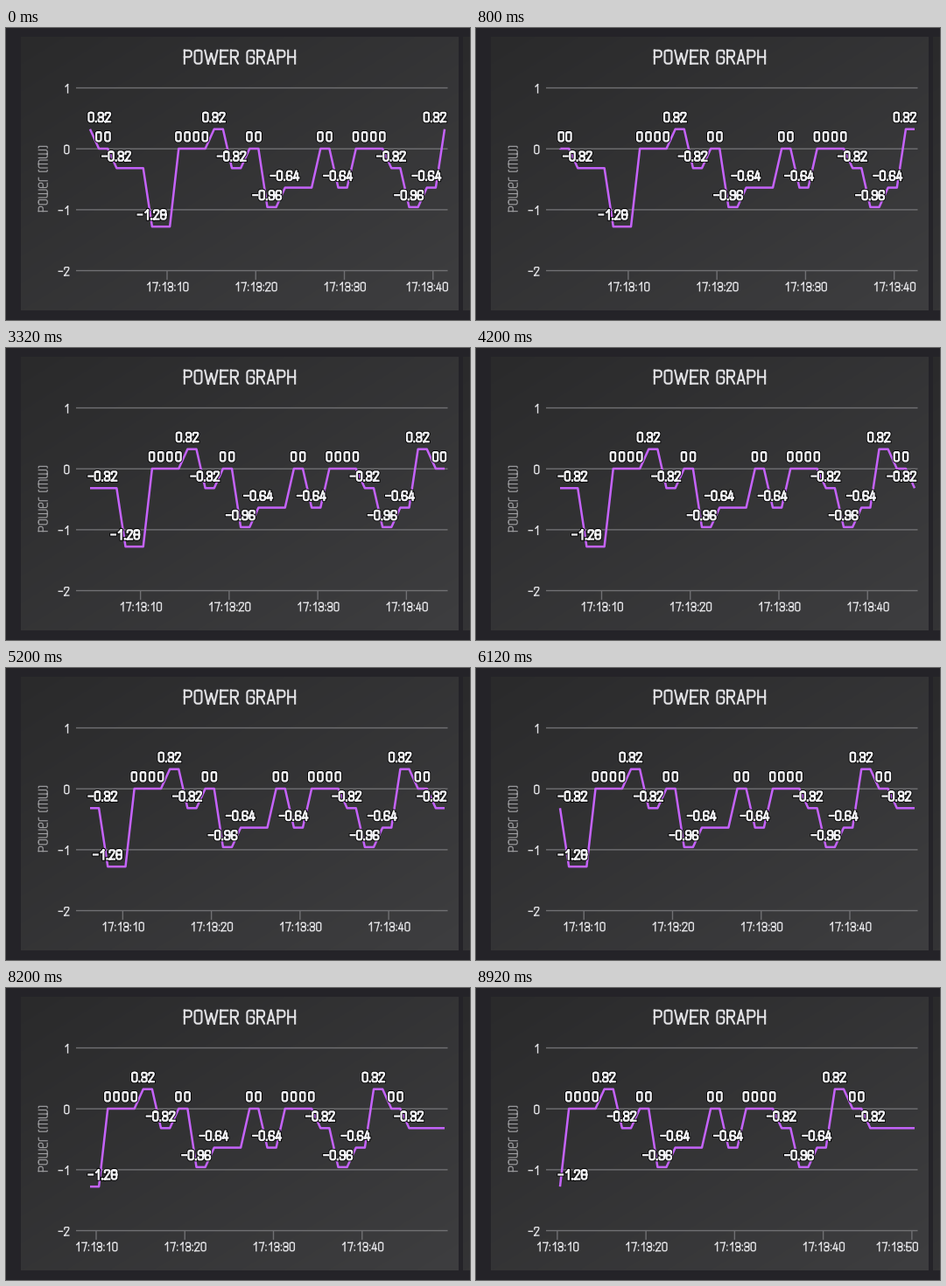
Write a matplotlib script that moves like this. It is 530x334 px and loops after 9 s.

```python
import matplotlib.pyplot as plt
import numpy as np
from matplotlib.animation import FuncAnimation
from matplotlib.patches import PathPatch
from matplotlib.patheffects import withStroke
from matplotlib.path import Path
from matplotlib.transforms import Affine2D

W, H, PX = 530, 334, 0.72          # stage size, points per pixel
LEFT, RIGHT = 80, 504.5            # plot area
X0, STEP, SPAN = 96, 10.125, 40    # first point, px per second, visible seconds
Y0, UNIT = 138, 69.67
START, DURATION = 0.32, 0.5        # shift animation inside each second
TEXT, MUTED, GRID, PURPLE = "#E0E0E3", "#A0A0A3", "#707073", "#C563FC"

# (value, repeats)
RUNS = [(.32, 1), (0, 2), (-.32, 4), (-1.28, 3), (0, 4), (.32, 2), (-.32, 2),
        (0, 2), (-.96, 2), (-.64, 4), (0, 2), (-.64, 2), (0, 4), (-.32, 2),
        (-.96, 2), (-.64, 2), (.32, 2), (0, 2), (-.32, 6)]
values = np.repeat(*zip(*RUNS))

# Narrow stroke lettering: points a..y lie on a 5 x 5 lattice, row by row
STROKES = {
    "0": "ceyuac", "1": "gd dx", "2": "faeju uy", "3": "faeol loyup",
    "4": "cp pt ix", "5": "ea ak koyup", "6": "jeauyok", "7": "ae ew",
    "8": "ceyuac ko", "9": "okaeyup", "-": "ko", "P": "ua aeok",
    "O": "ceyuac", "W": "av vh hx xe", "E": "ae au kn uy",
    "R": "ua aeok my", "G": "jeauyom", "A": "uc cy qs", "H": "au ey ko",
    "o": "ceyuac", "w": "auye cw", "e": "koeauy", "r": "uae",
    "m": "uaey cw", "(": "eauy", ")": "aeyu",
}
WIDTHS = {"W": .95, "w": .9, "m": .9, "r": .35, "(": .17, ")": .17,
          ".": .05, ":": .05, "-": .45, " ": .2}
DOTS = {".": (1,), ":": (.36, .94)}
GAP, RADIUS = .25, .2


def rounded(pts):
    """Polyline with rounded inner corners, as vertices and codes."""
    verts, codes = [pts[0]], [Path.MOVETO]
    for a, b, c in zip(pts, pts[1:], pts[2:]):
        u, v = a - b, c - b
        lu, lv = np.hypot(*u), np.hypot(*v)
        r = min(RADIUS, lu / 2, lv / 2)
        verts += [b + u / lu * r, b, b + v / lv * r]
        codes += [Path.LINETO, Path.CURVE3, Path.CURVE3]
    return verts + [pts[-1]], codes + [Path.LINETO]


def lettering(text, cap):
    """Path of the text centred on the origin, and its width."""
    verts, codes, x = [], [], 0
    for ch in text:
        w = WIDTHS.get(ch, .53)
        strokes = []
        for word in STROKES.get(ch, "").split():
            cells = [divmod(ord(p) - ord("a"), 5) for p in word]
            strokes.append([np.array([x + col * w / 4, row / 4]) for row, col in cells])
        for y in DOTS.get(ch, ()):
            strokes.append([np.array([x + w / 2, y - .04]), np.array([x + w / 2, y])])
        for pts in strokes:
            v, c = rounded(pts)
            verts += v
            codes += c
        x += w + GAP
    width = x - GAP
    return Path((np.array(verts) - [width / 2, .5]) * cap, codes), width * cap


fig = plt.figure(figsize=(W / 100, H / 100), dpi=100)
ax = fig.add_axes([0, 0, 1, 1])
ax.axis("off")


def add_text(text, x, y, cap, color, weight, angle=0, **kw):
    path, width = lettering(text, cap)
    patch = PathPatch(path, fill=False, ec=color, lw=weight * PX, snap=False,
                      capstyle="projecting", joinstyle="round", **kw)
    patch.width = width + weight
    ax.add_artist(patch)
    move(patch, x, y, angle)
    return patch


def move(patch, x, y, angle=0):
    patch.set_transform(Affine2D().rotate_deg(angle).translate(x, y) + ax.transData)


def add_rule(xs, ys):
    rule, = ax.plot(xs, ys, color=GRID, lw=1.4 * PX, snap=False,
                    solid_capstyle="butt")
    return rule


def y_of(value):
    return Y0 - UNIT * value


def backdrop():
    img = np.empty((H, W, 3))
    img[:] = np.array([36, 35, 40]) / 255
    dark, light = np.array([42, 42, 43]) / 255, np.array([62, 62, 64]) / 255
    yy, xx = np.mgrid[10:323, 0:W]
    for left, right in ((17, 517), (522, W)):
        u = ((xx - left) / 500 + (yy - 10) / 313) / 2
        shade = dark + (light - dark) * u[..., None]
        img[10:323, left:right] = shade[:, left:right]
    return img


ax.imshow(backdrop(), extent=(0, W, H, 0), interpolation="nearest", aspect="auto")
ax.set_xlim(0, W)
ax.set_ylim(H, 0)

add_text("POWER GRAPH", 267, 33.2, 15, TEXT, 2.1)
add_text("Power (mw)", 42.2, 172.5, 10, MUTED, 1.15, angle=-90)
for level in (1, 0, -1, -2):
    y = y_of(level) + .2
    add_rule([LEFT, RIGHT], [y, y])
    label = add_text(str(level), 0, 0, 9.4, TEXT, 1.4)
    move(label, 72.5 - label.width / 2, y + .8)

ticks = [(add_rule([0, 0], [278, 288]),
          add_text(f"17:13:{10 * j + 10}", 0, 0, 9.4, TEXT, 1.4)) for j in range(5)]

line, = ax.plot([], [], color=PURPLE, lw=2.5 * PX, zorder=3,
                solid_joinstyle="round", solid_capstyle="butt")

outline = [withStroke(linewidth=4 * PX, foreground="black")]
labels = [add_text(f"{v:.2f}" if v else "0", 0, 0, 10.3, "#F0F0F3", 2.3,
                   zorder=5, path_effects=outline) for v in values]


def lerp(a, b, u):
    return a + (b - a) * u


def shown(i, k):
    """Labels of equal neighbours overlap, so only the first of a run stays."""
    if not k <= i <= k + SPAN:
        return False
    return values[i] == 0 or i == k or values[i] != values[i - 1]


def label_x(i, k):
    """Label centre, kept inside the plot."""
    half = labels[i].width / 2
    return np.clip(X0 + STEP * (i - k) - .3, X0 - 2.7 + half, RIGHT - 1.2 - half)


def tick_x(j, k):
    return 184 + 10 * STEP * j - STEP * k


def draw_labels(k, ease):
    for i, label in enumerate(labels):
        before, after = float(shown(i, k)), float(shown(i, k + 1))
        x, alpha = label_x(i, k), before
        if ease > 0:
            x = lerp(x, label_x(i, k + 1), ease)
            # points that enter or leave switch at once, the others fade
            swapped = i in (k, k + SPAN + 1)
            alpha = after if swapped else lerp(before, after, ease)
        label.set_visible(alpha > 0)
        label.set_alpha(alpha)
        move(label, x, y_of(values[i]) - 13.7)


def draw_ticks(k, ease):
    for j, (mark, label) in enumerate(ticks):
        a, b = tick_x(j, k), tick_x(j, k + 1)
        alpha = lerp(float(a <= RIGHT), float(b <= RIGHT), ease)
        x = lerp(a, b, ease)
        mark.set_xdata([x, x])
        move(label, min(x + .2, 505 - label.width / 2), 296)
        for artist in (mark, label):
            artist.set_alpha(alpha)
            artist.set_visible(alpha > 0)


def draw_line(k, ease):
    i = np.arange(k, k + SPAN + 1)
    x, y = X0 + STEP * (i - k - ease), y_of(values[i])
    if ease > 0:
        # both ends stay in place while their heights slide to the next value
        first = lerp(y[0], y[1], ease)
        last = lerp(y[-1], y_of(values[k + SPAN + 1]), ease)
        x = np.r_[X0, x[1:], X0 + STEP * SPAN]
        y = np.r_[first, y[1:], last]
    line.set_data(x, y)


def update(n):
    k, tenth = divmod(n, 10)
    p = np.clip((tenth / 10 - START) / DURATION, 0, 1)
    ease = (1 - np.cos(np.pi * p)) / 2
    if p == 1:
        k, ease = k + 1, 0
    draw_line(k, ease)
    draw_ticks(k, ease)
    draw_labels(k, ease)
    return []


anim = FuncAnimation(fig, update, frames=90, interval=100, repeat=True, blit=False)
plt.show()
```
